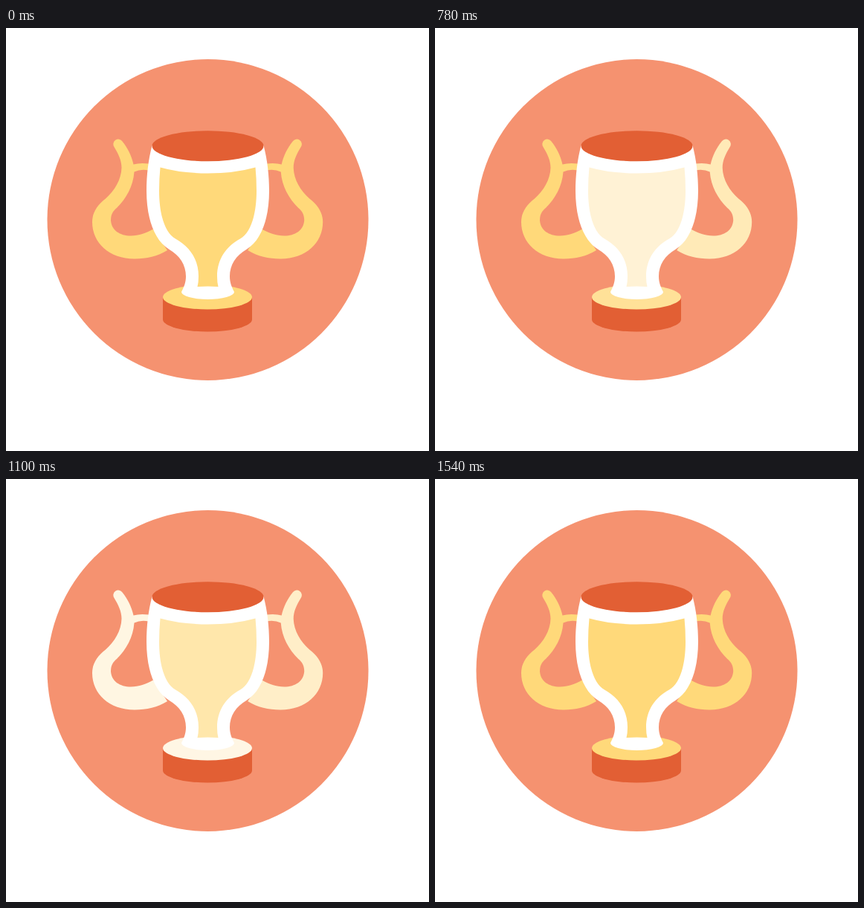
These frames come from a looping animation (569x569 px, 1580 ms). An HTML page:

```html
<!DOCTYPE html>
<html lang="en">
<head>
<meta charset="utf-8">
<title>Trophy</title>
<style>
  html, body { margin: 0; width: 100%; height: 100%; overflow: hidden; background: #fff; }
  svg { display: block; width: 100vw; height: 100vh; }
  .gold { fill: #ffd97a; }
  .rust { fill: #e25f34; }
</style>
</head>
<body>
<svg viewBox="0 0 569 569">
  <defs>
    <g id="handle">
      <path d="M156.5 152.5C164 162 169 172 171.5 183.5Q180 181 192 182.5V191.5Q181 189.500 172.500 193.500
        C171 213 162 229 149 242C143 247 141 252 141 259C142 272 153 279.500 168 279.500
        C179 279.500 188 276 198 270.500L217 299C204 307 189 310.500 173 310.500
        C139 310.500 116 289 116 261C116 248 123 238 134 229.500C146 219 155 204 155.500 188
        C155.500 178 151 169 145.500 160A6.600 6.600 0 0 1 156.500 152.500Z"/>
    </g>
  </defs>
  <circle cx="271.500" cy="258" r="216" fill="#f59270"/>
  <g id="left" class="gold"><use href="#handle"/></g>
  <g id="right" class="gold"><use href="#handle" transform="translate(542.200) scale(-1 1)"/></g>
  <path class="rust" d="M211 362V392A60 16.500 0 0 0 331 392V362Z"/>
  <ellipse id="foot" class="gold" cx="271" cy="362" rx="60" ry="16.500"/>
  <path fill="#fff" d="M196.500 158C191.500 177 189 198 189 219C189 255 199 285 219 297.500
    C234 306 242 319 242 334C242 343 239 349 236 355
    A35.500 10 0 0 0 307 355C304 349 301 343 301 334C301 319 309 306 324 297.500
    C344 285 354 255 354 219C354 198 351.500 177 346.500 158Z"/>
  <path id="bowl" class="gold" d="M207.500 187.500Q236 195.500 271.500 195.500T335.500 187.500
    Q337 203 337 219C337 251 329 276 315 283.500C296 294 284 311 284 334
    Q284 342 285.500 348Q271.500 346.800 257.500 348Q259 342 259 334
    C259 311 247 294 228 283.500C214 276 206 251 206 219Q206 203 207.500 187.500Z"/>
  <ellipse class="rust" cx="271.500" cy="158.700" rx="75" ry="20.500"/>
</svg>
<script>
  const LOOP = 1580, HOLD = 540, STEP = 40;
  const RISE = 370, FALL = 390;
  const GOLD = [255, 217, 122], PALE = [255, 250, 242];

  // The glow passes from part to part, each starting a little later.
  const parts = ['bowl', 'right', 'foot', 'left'].map((id, i) => ({
    el: document.getElementById(id),
    start: 500 + 93 * i
  }));

  function glow(age) {
    const level = age < RISE ? age / RISE : 1 - (age - RISE) / FALL;
    return Math.max(0, Math.min(1, level));
  }

  function mix(k) {
    return `rgb(${GOLD.map((c, i) => Math.round(c + (PALE[i] - c) * k))})`;
  }

  function draw(now) {
    const t = now % LOOP;
    const tick = t < HOLD ? 0 : HOLD + Math.floor((t - HOLD) / STEP) * STEP;
    for (const { el, start } of parts) el.style.fill = mix(glow(tick - start));
    requestAnimationFrame(() => draw(performance.now() - origin));
  }

  const origin = performance.now();
  draw(0);
</script>
</body>
</html>
```
